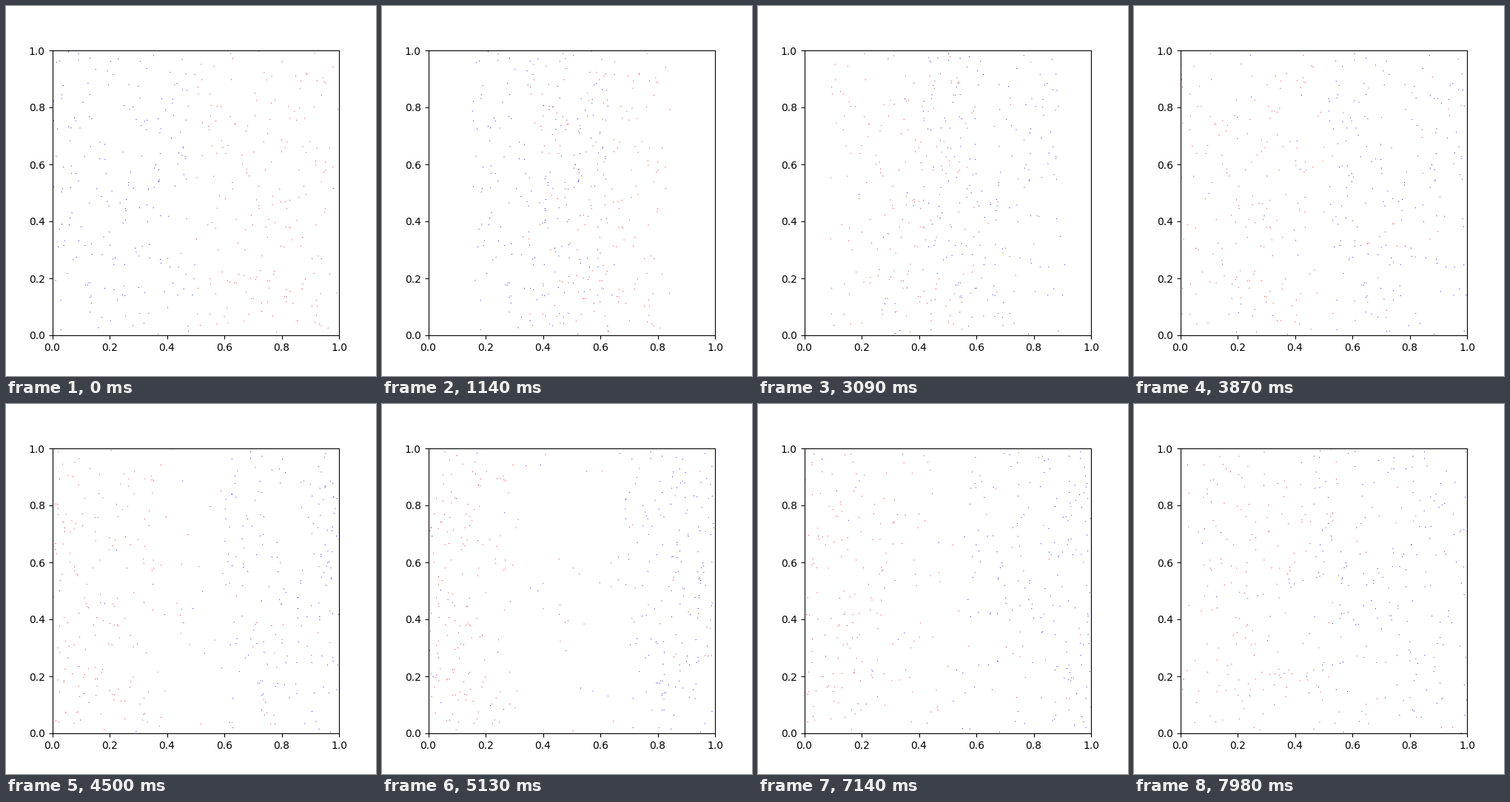
Write a matplotlib script that moves like this. It is 500 px wide and 500 px high and loops after 8 s.

```python
import numpy as np
import matplotlib.pyplot as plt
from matplotlib.animation import FuncAnimation

COUNT = 400
STEPS = 267
STEP_MS = 30
FRAME_MS = 20
LOOP_MS = 8000
SPEED = 0.004        # box widths per step
REACH = 0.002        # two particles collide when closer than this
DOT_PX = 1.05

rng = np.random.default_rng(7)
start = rng.random((COUNT, 2))
right = start[:, 0] > 0.5
first, second = np.triu_indices(COUNT, 1)


def collide(pos, vel):
    """Elastic collisions of equal masses for every pair in reach."""
    gap = pos[first] - pos[second]
    hit = (gap ** 2).sum(axis=1) < REACH ** 2
    a, b, d = first[hit], second[hit], gap[hit]
    along = ((vel[a] - vel[b]) * d).sum(axis=1) / (d ** 2).sum(axis=1)
    push = along[:, None] * d
    va, vb = vel[a] - push, vel[b] + push
    vel[a], vel[b] = va, vb


def bounce(pos, vel):
    vel[pos > 1] = -np.abs(vel[pos > 1])
    vel[pos < 0] = np.abs(vel[pos < 0])


def simulate():
    pos = start.copy()
    vel = np.zeros_like(pos)
    vel[:, 0] = np.where(right, -SPEED, SPEED)
    path = [pos]
    for _ in range(STEPS - 1):
        collide(pos, vel)
        bounce(pos, vel)
        pos = pos + vel
        path.append(pos)
    return path


path = simulate()

fig, ax = plt.subplots(figsize=(5, 5), dpi=100)
ax.set_xlim(0, 1)
ax.set_ylim(0, 1)
dots = ax.scatter(
    start[:, 0], start[:, 1],
    s=(DOT_PX * 72 / fig.dpi) ** 2,
    c=np.where(right, "red", "blue"),
    linewidths=0,
)


def draw(i):
    # sample mid-frame so each 30 ms step starts on the nearest 20 ms tick
    step = (i * FRAME_MS + FRAME_MS // 2) // STEP_MS
    dots.set_offsets(path[step])
    return (dots,)


anim = FuncAnimation(fig, draw, frames=LOOP_MS // FRAME_MS,
                     interval=FRAME_MS, repeat=True, repeat_delay=0)
plt.show()
```
